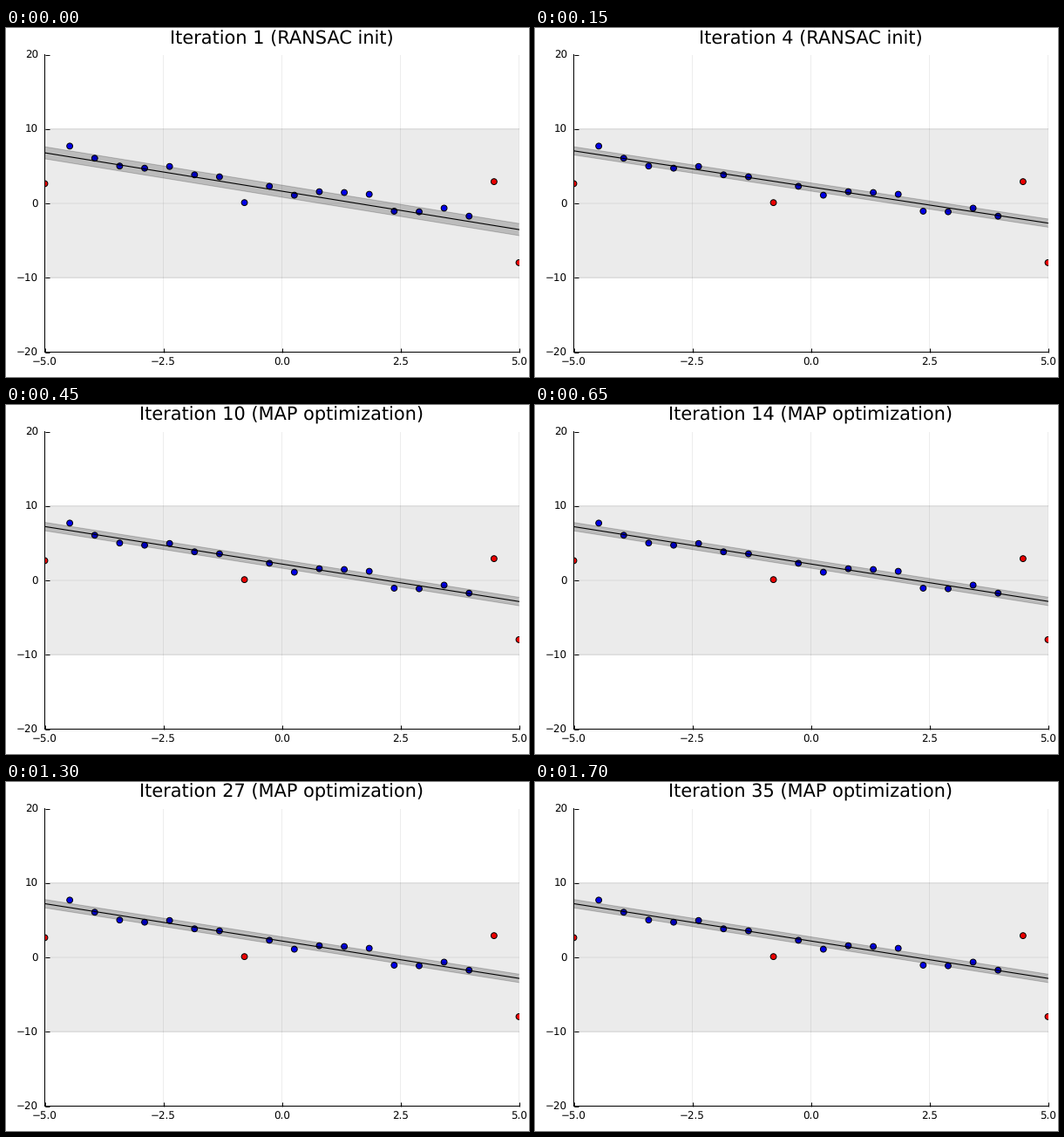
These frames come from a looping animation (600 by 400 pixels, 1750 ms). A matplotlib script:

```python
import numpy as np
import matplotlib.pyplot as plt
from matplotlib.animation import FuncAnimation

W, H, DPI = 600, 400, 100
FRAMES, INTERVAL = 35, 50
LEFT, RIGHT, TOP, BOTTOM = 44.5, 588.5, 30.5, 371.5
PX = 72 / DPI  # points per pixel
INIT_STEPS = 5

plt.rcParams["text.hinting"] = "none"
plt.rcParams["path.snap"] = False

xs = np.linspace(-5, 5, 20)
ys = np.array([2.65, 7.70, 6.07, 5.02, 4.73, 4.96, 3.84, 3.57, 0.10, 2.30,
               1.10, 1.57, 1.46, 1.22, -1.05, -1.13, -0.64, -1.72, 2.92, -7.97])
ends = np.array([-5.0, 5.0])

# Fit values: height at x = -5, height at x = 5, half width of the band
FIRST = np.array([6.80, -3.52, 0.81])
BEST = np.array([7.06, -2.65, 0.55])
OVERSHOOT = np.array([7.48, -3.14, 0.61])
FINAL = np.array([7.22, -2.82, 0.56])


def fit_at(step):
    """Line and band for a given iteration, counted from 1."""
    if step == 1:
        return FIRST
    if step <= INIT_STEPS:
        return BEST
    if step <= INIT_STEPS + 2:
        return BEST + (OVERSHOOT - BEST) * (step - INIT_STEPS) / 2
    if step >= 13:
        return FINAL
    return FINAL + (OVERSHOOT - FINAL) * 0.4 ** (step - INIT_STEPS - 2)


def point_colors(step):
    outliers = {0, 18, 19} if step == 1 else {0, 8, 18, 19}
    return ["#ff0000" if i in outliers else "#0000ff" for i in range(len(xs))]


def label(x, y, text, size, ha):
    return fig.text(x / W, 1 - y / H, text, fontsize=size * PX, ha=ha,
                    va="baseline", family="DejaVu Sans", color="black")


def band_corners(low, high):
    return np.column_stack([np.r_[ends, ends[::-1]], np.r_[low, high[::-1]]])


fig = plt.figure(figsize=(W / DPI, H / DPI), dpi=DPI, facecolor="white")
ax = fig.add_axes([LEFT / W, 1 - BOTTOM / H, (RIGHT - LEFT) / W, (BOTTOM - TOP) / H])
ax.set(xlim=(-5, 5), ylim=(-20, 20), facecolor="none")
ax.set_xticks(np.arange(-5, 5.1, 2.5))
ax.set_yticks(range(-20, 21, 10))
ax.tick_params(direction="in", length=5 * PX, width=PX, labelbottom=False, labelleft=False)
ax.grid(color="black", alpha=0.07, linewidth=PX)
ax.set_axisbelow(True)
for side in ("top", "right"):
    ax.spines[side].set_visible(False)
for side in ("left", "bottom"):
    ax.spines[side].set(linewidth=PX, zorder=1.5)

for value in ax.get_xticks():
    x = LEFT + (value + 5) / 10 * (RIGHT - LEFT)
    label(x, 386.8, f"{value:.1f}".replace("-", "\u2212"), 11.9, "center")
for value in ax.get_yticks():
    y = TOP + (20 - value) / 40 * (BOTTOM - TOP)
    label(37.2, y + 4.4, f"{value:.0f}".replace("-", "\u2212"), 11.9, "right")
title = label(316.2, 17.9, "", 20.83, "center")

points = ax.scatter(xs, ys, s=(6.8 * PX) ** 2, edgecolors="black", linewidths=PX, zorder=2)


def add_band(low, high, alpha, edge_alpha):
    corners = band_corners(low, high)
    fill, = ax.fill(*corners.T, color="black", alpha=alpha, linewidth=0, zorder=3)
    edges = [ax.plot(ends, e, color="black", alpha=edge_alpha, linewidth=PX, zorder=3)[0]
             for e in (low, high)]
    return fill, edges


add_band(np.full(2, -10.0), np.full(2, 10.0), 0.08, 0.08)
band, band_edges = add_band(np.zeros(2), np.ones(2), 0.2, 0.2)
line, = ax.plot(ends, ends, color="black", linewidth=PX * 1.1, zorder=4)


def draw(frame):
    step = frame + 1
    start, stop, half = fit_at(step)
    mid = np.array([start, stop])
    line.set_ydata(mid)
    band.set_xy(band_corners(mid - half, mid + half))
    for edge, offset in zip(band_edges, (-half, half)):
        edge.set_ydata(mid + offset)
    points.set_facecolors(point_colors(step))
    stage = "RANSAC init" if step <= INIT_STEPS else "MAP optimization"
    title.set_text(f"Iteration {step} ({stage})")
    return [line, band, *band_edges, points, title]


anim = FuncAnimation(fig, draw, frames=FRAMES, interval=INTERVAL,
                     repeat=True, repeat_delay=0, blit=False)
plt.show()
```
